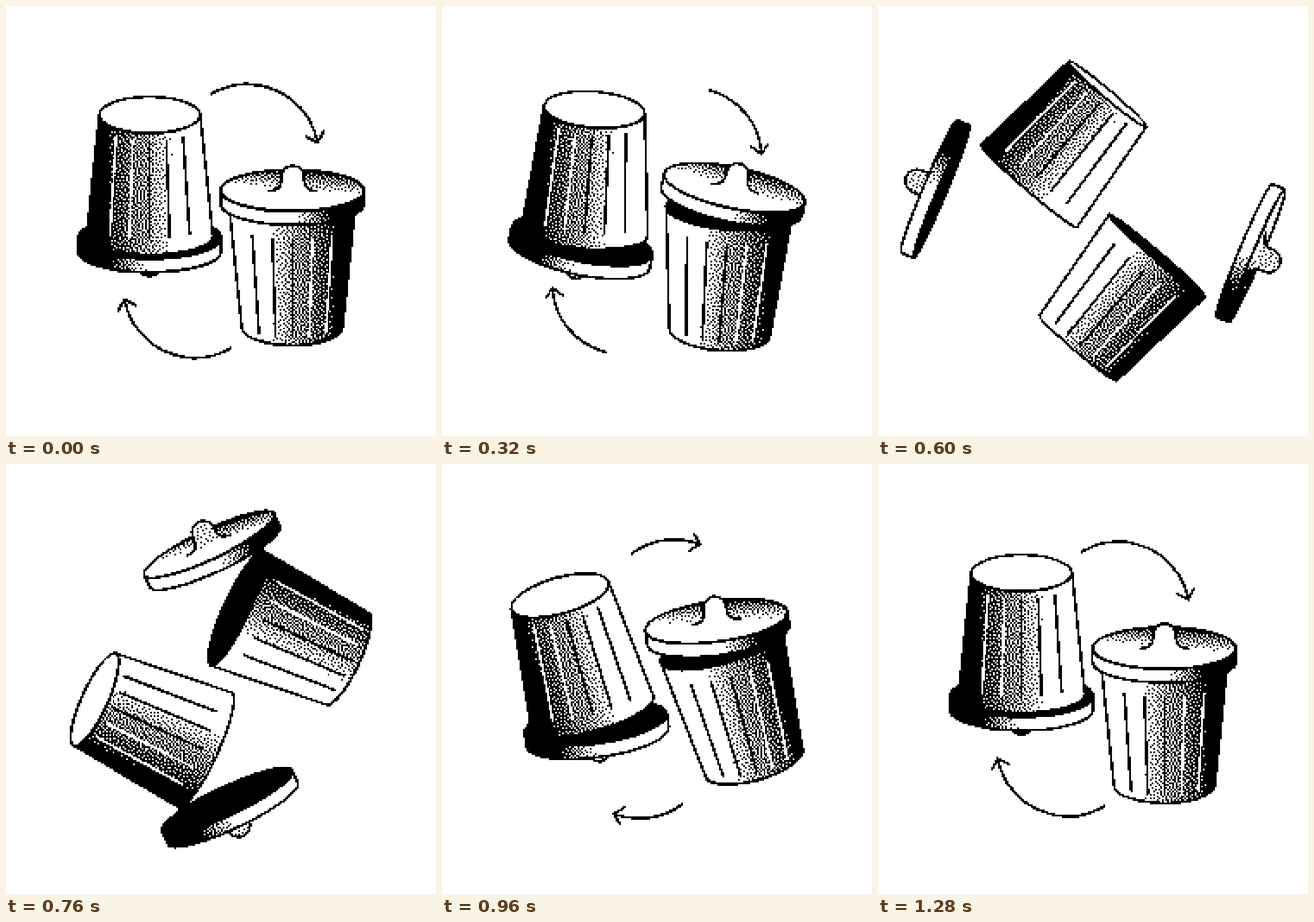
Write an HTML page with a canvas that moves like this. It is 748x748 px and loops after 1320 ms.

```html
<!DOCTYPE html>
<html lang="en">
<head>
<meta charset="utf-8">
<title>Swapping bins</title>
<style>
html, body { margin: 0; width: 100%; height: 100%; overflow: hidden; background: #fff; }
canvas { display: block; width: 100vw; height: 100vh; image-rendering: pixelated; }
</style>
</head>
<body>
<canvas id="stage" width="250" height="250"></canvas>
<script>
const SIZE = 250, STAGE = 748, LOOP = 1320, STEP = 40;
const ctx = document.getElementById('stage').getContext('2d', { willReadFrequently: true });
const { PI, abs, min, max, sin, cos, sqrt, exp } = Math;
const rad = d => d * PI / 180;

// Lines get marker colours so they stay crisp while the fills are stippled.
const BLACK = '#f00', WHITE = '#0ff', LINE = 4.1;

// Cubic Bezier easing from (0, 0) to (1, 1), solved by bisection.
function bezier(x1, y1, x2, y2) {
  const curve = (a, b, s) => 3 * (1 - s) ** 2 * s * a + 3 * (1 - s) * s * s * b + s ** 3;
  return x => {
    let lo = 0, hi = 1;
    for (let i = 0; i < 24; i++) {
      const mid = (lo + hi) / 2;
      if (curve(x1, x2, mid) < x) lo = mid; else hi = mid;
    }
    return curve(y1, y2, lo);
  };
}

const easeBody = bezier(.8, -.06, .295, 1);
const easeLid = bezier(.7, 0, .1, 1);

// Everything a bin needs at progress x: the lid flies out and spins ahead of the body.
function pose(x) {
  const turn = 180 * easeBody(x), spin = 180 * easeLid(x);
  return {
    turn,
    spin: 180 + spin,
    tilt: cos(rad((turn + spin) / 2)),
    orbit: turn - 108.3 - 11 * sin(PI * x) ** 2,
    dist: 131 + 153 * exp(-(((x - .477) / .14) ** 2))
  };
}

function paint(fill) {
  ctx.fillStyle = fill;
  ctx.fill();
  ctx.strokeStyle = BLACK;
  ctx.stroke();
}

function line(color, ...pts) {
  ctx.beginPath();
  pts.forEach(([x, y]) => ctx.lineTo(x, y));
  ctx.strokeStyle = color;
  ctx.stroke();
}

// Visible wall between two ellipses; k is the signed flatness of each.
function wall(r0, y0, k0, r1, y1, k1, fill) {
  ctx.beginPath();
  ctx.ellipse(0, y0, r0, abs(k0) * r0, 0, 0, PI, k0 < 0);
  ctx.ellipse(0, y1, r1, abs(k1) * r1, 0, PI, 0, k1 > 0);
  ctx.closePath();
  paint(fill);
}

function cap(r, y, k, fill) {
  ctx.beginPath();
  ctx.ellipse(0, y, r, abs(k) * r, 0, 0, 2 * PI);
  paint(fill);
}

const gray = v => { const c = Math.round(255 * v); return `rgb(${c},${c},${c})`; };

function shade(x0, y0, x1, y1, stops) {
  const g = ctx.createLinearGradient(x0, y0, x1, y1);
  stops.forEach(([p, v]) => g.addColorStop(p, gray(v)));
  return g;
}

function drawBody(k) {
  const len = 211, base = 88, rim = 110, kb = .365 * k, ko = .29 * k;
  const fill = shade(-78, 0, 44, 0, [[0, 0], [.12, .18], [.64, .6], [1, 1]]);
  wall(base, 0, kb, rim, len, ko, fill);
  for (let i = -2; i <= 2; i++) {
    const u = .325 * i, bulge = sqrt(1 - u * u);
    const at = v => {
      const r = base + (rim - base) * v;
      return [u * r, len * v + bulge * r * (kb + (ko - kb) * v)];
    };
    line(i < 0 ? WHITE : BLACK, at(.065), at(.87));
  }
  if (k > 0) cap(base, 0, kb, '#fff');
  else cap(rim, len, ko, '#000');
}

function drawKnob(y, k) {
  const w = 20, top = y - 23;
  ctx.beginPath();
  if (k > 0) {
    ctx.moveTo(-42, y + 1);
    ctx.quadraticCurveTo(-w, y, -w, y - 16);
  } else ctx.moveTo(-w, y);
  ctx.lineTo(-w, top);
  ctx.arc(0, top, w, PI, 2 * PI);
  if (k > 0) {
    ctx.lineTo(w, y - 16);
    ctx.quadraticCurveTo(w, y, 42, y + 1);
  } else ctx.lineTo(w, y);
  paint(gray(k > 0 ? 1 - .18 * min(1, 3 * (1 - k)) : .82));
}

function drawLid(tilt) {
  const r = 125, h = 12, k = .288 * tilt;
  if (k < 0) drawKnob(-h, tilt);
  wall(r, h, k, r, -h, k, shade(0, 0, 74, 0, [[0, 1], [.4, .65], [.85, .1], [1, 0]]));
  if (k < 0) return cap(r, h, k, '#000');
  const back = max(r * k, 4);
  cap(r, -h, k, shade(3, -h - back, 0, -h, [[0, .08], [.5, .55], [1, 1]]));
  drawKnob(-h, tilt);
}

function drawBin(x, side) {
  const { turn, spin, tilt, orbit, dist } = pose(x);
  const body = () => {
    ctx.save();
    ctx.rotate(rad(turn));
    ctx.translate(-124, -184.5);
    drawBody(tilt * side);
    ctx.restore();
  };
  const lid = () => {
    ctx.save();
    ctx.translate(dist * sin(rad(orbit)), -dist * cos(rad(orbit)));
    ctx.rotate(rad(spin));
    drawLid(-tilt * side);
    ctx.restore();
  };
  const parts = [body, lid];
  if (tilt * side > 0) parts.reverse();
  parts.forEach(draw => draw());
}

// The arrow grows before the loop point and is wiped from its tail after it.
function drawArrow(t) {
  const dt = t < LOOP / 2 ? t : t - LOOP;
  if (dt <= -440 || dt >= 540) return;
  const r = 124, span = 110, c = 21.6 + .02 * dt;
  const cx = 123 * sin(rad(c)), cy = -123 * cos(rad(c));
  const grow = 1 - max(0, -dt / 440) ** 4 ** .95;
  const a = c - 51.5 + span * max(0, dt / 540) ** 2;
  const b = c - 51.5 + span * grow;
  ctx.beginPath();
  ctx.arc(cx, cy, r, rad(a - 90), rad(b - 90));
  ctx.strokeStyle = BLACK;
  ctx.stroke();
  const tip = [cx + r * sin(rad(b)), cy - r * cos(rad(b))];
  const wing = d => {
    const w = rad(b - 97 + d);
    return [tip[0] + 22 * sin(w), tip[1] - 22 * cos(w)];
  };
  line(BLACK, wing(-45), tip, wing(45));
}

const noise = i => { const n = sin(i * 12.9898) * 43758.5453; return n - Math.floor(n) - .5; };

// Reduces the drawing to pure black and white by error diffusion.
function stipple() {
  const img = ctx.getImageData(0, 0, SIZE, SIZE), d = img.data;
  const err = new Float32Array(SIZE * (SIZE + 2));
  for (let i = 0; i < SIZE * SIZE; i++) {
    const p = i * 4, ink = (d[p] - d[p + 1]) / 255;
    let out;
    if (abs(ink) > .42) out = ink > 0 ? 0 : 255;
    else {
      const base = ink > 0 ? d[p + 1] / (1 - ink) : d[p] / (1 + ink);
      if (base > 249) out = 255;
      else if (base < 8) out = 0;
      else {
        const v = base + err[i];
        out = v < 128 + 90 * noise(i) ? 0 : 255;
        const e = (v - out) / 16;
        err[i + 1] += e * 7;
        err[i + SIZE - 1] += e * 3;
        err[i + SIZE] += e * 5;
        err[i + SIZE + 1] += e;
      }
    }
    d[p] = d[p + 1] = d[p + 2] = out;
  }
  ctx.putImageData(img, 0, 0);
}

function render(t) {
  ctx.setTransform(1, 0, 0, 1, 0, 0);
  ctx.fillStyle = '#fff';
  ctx.fillRect(0, 0, SIZE, SIZE);
  const s = SIZE / STAGE;
  ctx.setTransform(s, 0, 0, s, SIZE / 2, SIZE / 2);
  ctx.lineWidth = LINE;
  ctx.lineCap = ctx.lineJoin = 'round';
  for (const side of [1, -1]) {
    drawBin(t / LOOP, side);
    drawArrow(t);
    ctx.rotate(PI);
  }
  stipple();
}

const start = performance.now();
let shown = -1;
function tick() {
  const t = Math.floor(((performance.now() - start) % LOOP) / STEP) * STEP;
  if (t !== shown) render(shown = t);
  requestAnimationFrame(tick);
}
tick();
</script>
</body>
</html>
```
